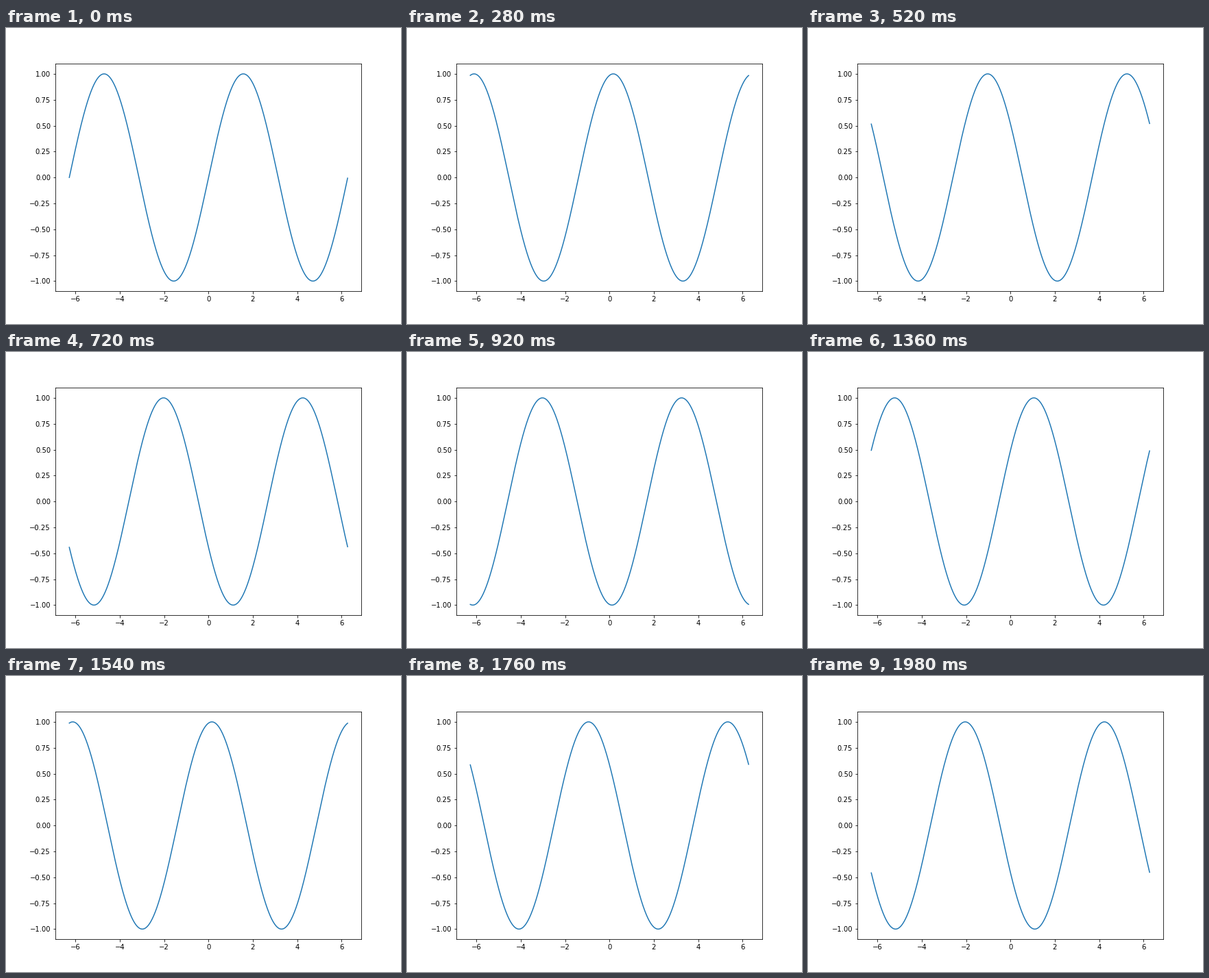
Animation, 576 px wide and 432 px high, one loop 2000 ms. Source, as a matplotlib script:

```python
import numpy as np
import matplotlib.pyplot as plt
from matplotlib.animation import FuncAnimation

FRAMES = 100
INTERVAL = 20  # ms
PHASE_STEP = 0.1  # radians per frame

fig, ax = plt.subplots(figsize=(8, 6), dpi=72)

x = np.arange(-2 * np.pi, 2 * np.pi, 0.01)
line, = ax.plot(x, np.sin(x))


def update(i):
    line.set_ydata(np.sin(x + PHASE_STEP * i))
    return line,


anim = FuncAnimation(fig, update, frames=FRAMES, interval=INTERVAL,
                     repeat=True, repeat_delay=0)

plt.show()
```
